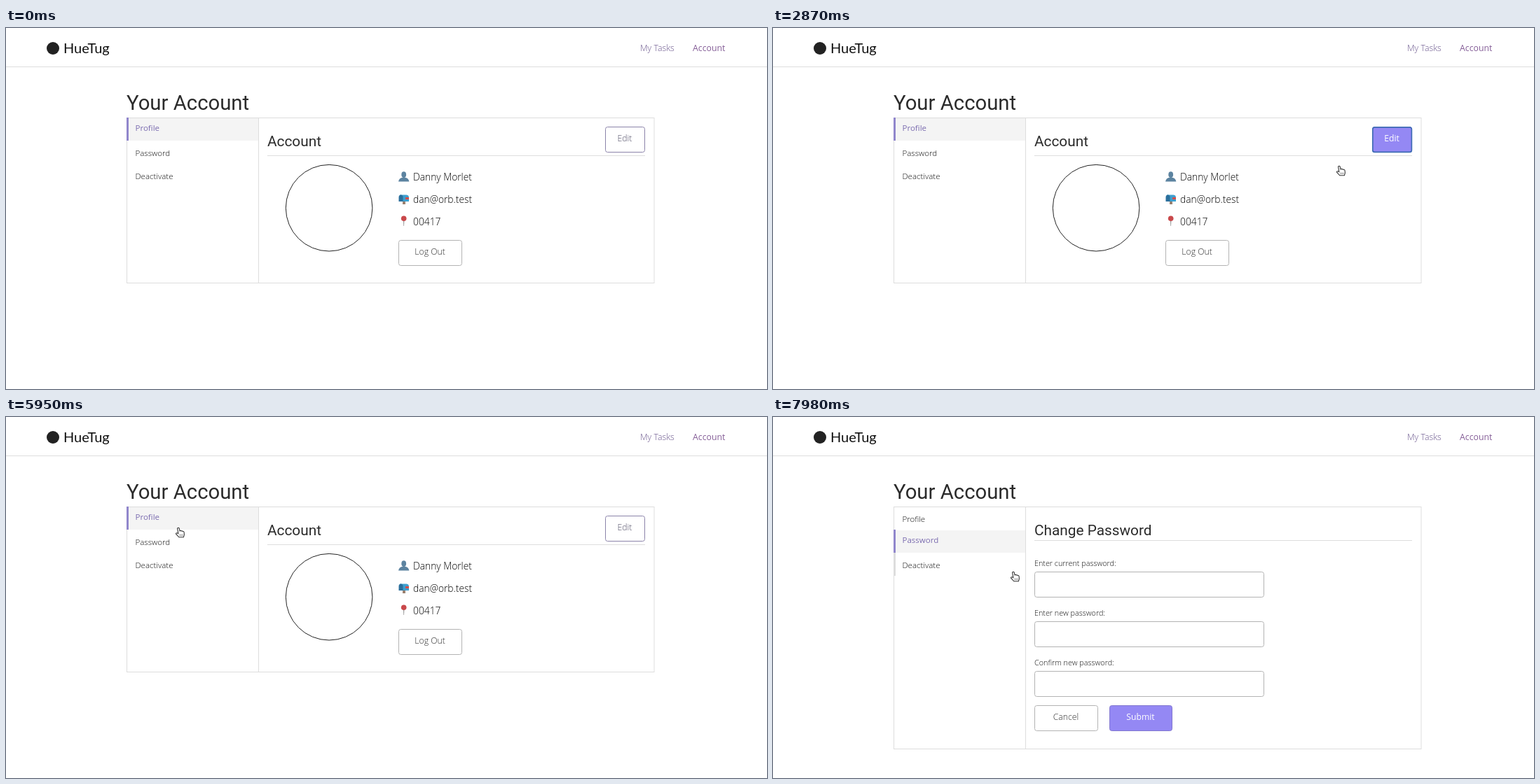
Animation, 1086 px wide and 516 px high, one loop 8000 ms. Source, as an HTML page:

```html
<!DOCTYPE html>
<html lang="en">
<head>
<meta charset="utf-8">
<title>Account settings</title>
<style>
  html, body { margin: 0; width: 100%; height: 100%; overflow: hidden; background: #fff; }
  svg { display: block; width: 1086px; height: 516px; }
  text { font-family: "Open Sans", "Noto Sans", sans-serif; font-weight: 300; fill: #111; white-space: pre; }
  .head { font-family: Roboto, sans-serif; font-weight: 400; font-size: 20.8px; fill: #2b2b2b; }
  .title { font-size: 29.3px; }
  .brand { font-family: Lato, sans-serif; font-weight: 400; font-size: 20px; }
  .nav { font-size: 12.3px; fill: #69558c; }
  .on { font-weight: 400; fill: #845d97; }
  .side { font-size: 11.5px; }
  .active { font-weight: 400; fill: #7b6cb0; }
  .info { font-size: 13.8px; fill: #000; }
  .label { font-size: 10.8px; }
  .hint { font-size: 10.8px; fill: #666; }
  .btn { font-size: 12.2px; text-anchor: middle; fill: #333; }
  .pale { fill: #55526a; }
  .white { fill: #fff; font-weight: 400; }
</style>
</head>
<body>
<svg id="stage" viewBox="0 0 1086 516"></svg>
<script>
const LOOP = 8000, TICK = 70, LAG = 210;
const GREY = '#ddd', VIOLET = '#9488f4', BAR = '#9187cc';
const LEFT = 172, TOP = 128, ROW = 33, SIDE = 188, GAP = 71.2;
const stage = document.getElementById('stage');

const text = (x, y, s, cls) => `<text x="${x}" y="${y}" class="${cls}">${s}</text>`;
const rect = (x, y, w, h, fill, more = '') =>
  `<rect x="${x}" y="${y}" width="${w}" height="${h}" fill="${fill}" ${more}/>`;
const frame = (x, y, w, stroke = '#b3b3b3', fill = '#fff') =>
  rect(x + .5, y + .5, w, 36, fill, `rx="3" stroke="${stroke}"`);
const rule = (x, y, w) => rect(x, y, w, 1, GREY);
const group = (id, body) => `<g id="${id}">${body}</g>`;
const avatar = y => `<circle cx="461.1" cy="${y}" r="61.8" fill="none" stroke="#222"/>`;
const heading = (s, lineY) => text(373, 168.5, s, 'head') + rule(373, lineY, 539);
const button = (x, y, w, s, stroke, fill, cls = '') =>
  frame(x, y, w, stroke, fill) + text(x + w / 2, y + 21, s, 'btn ' + cls);
const field = (x, y, w, name, hint = '') =>
  text(x, y, name, 'label') + frame(x, y + 8, w) + text(x + 9, y + 29, hint, 'hint');
const column = (x, y, w, rows) =>
  rows.map(([name, hint], i) => field(x, Math.round(y + i * GAP), w, name, hint)).join('');

// Panel with its sidebar; active is the index of the highlighted row, or -1
function panel(bottom, active) {
  let out = rect(LEFT + .5, TOP + .5, 752.5, bottom - TOP, 'none', `stroke="${GREY}"`) +
    rect(LEFT + SIDE, TOP, 1, bottom - TOP, GREY);
  ['Profile', 'Password', 'Deactivate'].forEach((s, i) => {
    const y = TOP + i * ROW, now = i === active;
    if (now) out += rect(LEFT, y + 1, SIDE, ROW - 1, '#f4f4f4') + rect(LEFT, y, 3, ROW, BAR);
    out += text(184.5, y + (now ? 19.3 : 22), s, now ? 'side active' : 'side');
  });
  return out;
}

const icons = `
  <g fill="#5c83a0"><ellipse cx="567.7" cy="209.6" rx="3.4" ry="4.4"/>
    <path d="M560 219.5q1-6 7.7-6t7.7 6z"/></g>
  <path d="M566 246h4v6h-4z" fill="#9a8170"/>
  <path d="M562 238.5h9q4 0 4 4v5.5h-13z" fill="#3f9fce"/>
  <path d="M560.5 248v-6q0-3.5 3-3.5t3 3.5v6z" fill="#2b6f9c"/>
  <path d="M570 242h5v3h-5z" fill="#cf4f4c"/>
  <path d="M567 274h1.4l-.4 9h-.6z" fill="#8d8d8d"/>
  <circle cx="567.7" cy="272.3" r="3.8" fill="#c9484b"/>`;

const pages = {
  profile: { active: 0, body: panel(364, 0) + heading('Account', 182) +
    group('editOff', button(855, 141, 56, 'Edit', '#8b83aa', '#fff', 'pale')) +
    group('editOn', button(855, 141, 56, 'Edit', VIOLET, VIOLET, 'white')) +
    group('focus', rect(855.8, 141.8, 55.6, 35.6, 'none', 'rx="3" stroke="#3f6cb4" stroke-width="1.7"')) +
    avatar(257.2) + icons +
    ['Danny Morlet', 'dan@orb.test', '00417']
      .map((s, i) => text(581, 218 + i * 32, s, 'info')).join('') +
    button(560, 303, 90, 'Log Out') },
  edit: { active: -1, body: panel(560, -1) + heading('Edit Profile', 176) + avatar(276) +
    field(708, 234, 163, 'Last Name', 'Morlet') +
    column(536, 234, 155, [['First Name', 'Danny'], ['Email', 'dan@orb.test'],
      ['Phone Number'], ['Zip Code', '00417']]) },
  password: { active: 1, body: panel(474, 1) + heading('Change Password', 176) +
    column(373, 213, 327, [['Enter current password:'], ['Enter new password:'],
      ['Confirm new password:']]) +
    button(373, 412, 90, 'Cancel') + button(480, 412, 89, 'Submit', '#8278cf', VIOLET, 'white') }
};

const arrow = '<path d="M0 0V12.2L2.8 9.6L4.8 14L7 13L5 8.8H8.8Z" fill="#000" stroke="#fff" stroke-width=".8"/>';
const hand = `<path d="M-1.4 1.1Q0-.6 1.2 1L2 4.8Q3.3 3.8 4.2 5Q5.5 4.3 6.2 5.6Q7.7 5 8.1 6.8
  L8.4 10.2L7.4 13.8H.8L-3.4 9.2Q-3.8 7.6-2.2 7.8L-.2 8.7Z" fill="#fff" stroke="#333" stroke-width="1.1"/>
  <path d="M2.1 9.6V12M4 9.6V12M5.9 9.6V12" stroke="#555" stroke-width=".7"/>`;

stage.innerHTML = rect(0, 0, 1086, 516, '#fff') + rule(0, 55, 1086) +
  '<circle cx="67" cy="29" r="9" fill="#222"/>' + text(82, 36, 'HueTug', 'brand') +
  text(905, 33, 'My Tasks', 'nav') + text(980, 33, 'Account', 'nav on') +
  text(LEFT, 117, 'Your Account', 'head title') +
  Object.entries(pages).map(([id, p]) => group(id, p.body)).join('') +
  group('hover', rect(LEFT, 0, 3, ROW, GREY)) +
  group('cursor', group('arrow', arrow) + group('hand', hand));

// Pointer moves, each easing from the last place: start, duration, x, y
const moves = [
  [140, 700, 941, 32], [840, 350, 888, 161], [1400, 350, 245, 205], [1820, 420, 883, 160],
  [2660, 210, 808, 197], [2870, 420, 701, 243], [3570, 70, 727, 360], [4130, 280, 832, 290],
  [4410, 630, 267, 150], [5600, 70, 246, 158], [6650, 140, 221, 204], [6930, 210, 225, 180],
  [7350, 350, 343, 221]
];
const ease = k => k * k * (3 - 2 * k);

function pointer(t) {
  let x = 514, y = 497;
  for (const [start, span, toX, toY] of moves) {
    const k = ease(Math.min(1, Math.max(0, (t - start) / span)));
    x += (toX - x) * k;
    y += (toY - y) * k;
  }
  return { x, y };
}

const show = (id, on) => { document.getElementById(id).style.display = on ? '' : 'none'; };
const move = (id, x, y) => document.getElementById(id).setAttribute('transform', `translate(${x} ${y})`);

function draw(t) {
  const page = t < 3080 ? 'profile' : t < 5950 ? 'edit' : t < 7420 ? 'profile' : 'password';
  Object.keys(pages).forEach(id => show(id, id === page));

  // Hover effects trail the pointer
  const late = pointer(t - LAG), row = Math.floor((late.y - TOP) / ROW);
  const onRow = late.x > LEFT && late.x < LEFT + SIDE && row >= 0 && row < 3;
  const onEdit = page === 'profile' && Math.abs(late.x - 883) < 28 && Math.abs(late.y - 159) < 18;
  const focus = t >= 2450 && t < 3080;
  show('hover', onRow && row !== pages[page].active);
  move('hover', 0, TOP + row * ROW);
  show('editOn', onEdit || focus);
  show('editOff', !onEdit && !focus);
  show('focus', focus);

  const p = pointer(t);
  show('cursor', t >= 140);
  show('hand', onRow || onEdit);
  show('arrow', !onRow && !onEdit);
  move('cursor', p.x, p.y);
}

let start;
function loop(now) {
  if (start === undefined) start = now;
  const t = (now - start) % LOOP;
  draw(Math.floor(t / TICK) * TICK);
  requestAnimationFrame(loop);
}
draw(0);
requestAnimationFrame(loop);
</script>
</body>
</html>
```
